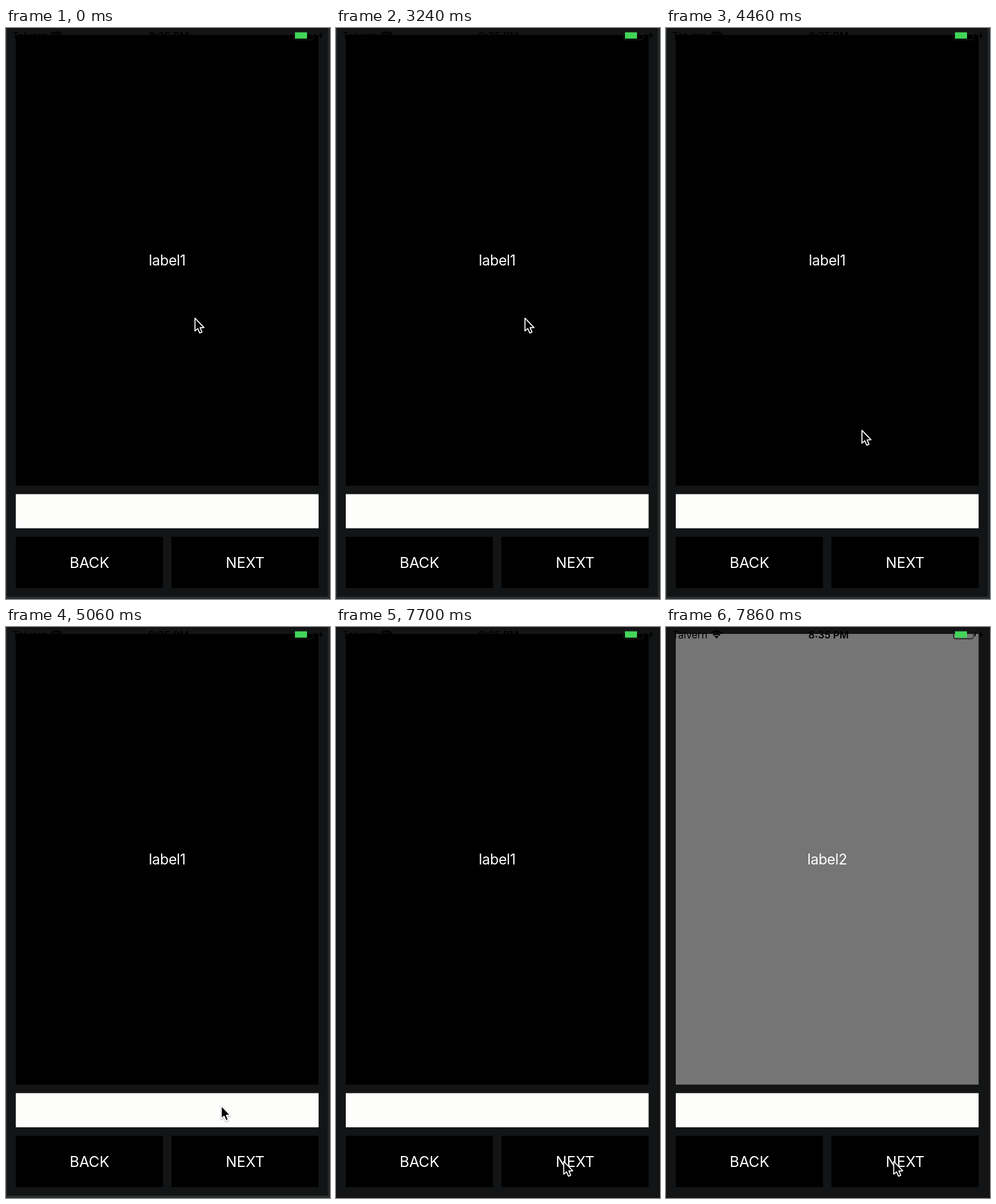
Write an HTML page with a canvas that moves like this. It is 564 px wide and 993 px high and loops after 8000 ms.

```html
<!DOCTYPE html>
<html lang="en">
<head>
<meta charset="utf-8">
<title>Label pager</title>
<style>
html, body { margin: 0; width: 100%; height: 100%; overflow: hidden; background: #121415; }
canvas { display: block; }
</style>
</head>
<body>
<canvas id="stage" width="564" height="993"></canvas>
<script>
const ctx = document.getElementById('stage').getContext('2d');
const LOOP = 8000;
const EDGE_GONE = 7400;
const NEXT_PAGE = 7720;
const FONT = 'Inter, "Open Sans", sans-serif';

// Layout in px: one point of the phone screen is PT wide
const PT = 1.485;
const LEFT = 17, WIDTH = 355 * PT, GAP = 10 * PT;
const BUTTON_W = (WIDTH - GAP) / 2, BUTTON_H = 60 * PT, FIELD_H = 40 * PT;
const BUTTON_Y = 974 - BUTTON_H;
const FIELD_Y = BUTTON_Y - GAP - FIELD_H;
const PANEL_Y = 12, PANEL_H = FIELD_Y - GAP - PANEL_Y;
const NEXT_X = LEFT + BUTTON_W + GAP;

const MOVE = { start: 3845, time: 2326, from: [329, 504.7], to: [396.5, 929.5] };

const easeOut = (u, power) => 1 - (1 - u) ** power;
const mix = (a, b, u) => a + (b - a) * u;

// The pointer slows down towards the button and swings right late
function pointerAt(t) {
  const u = Math.min(1, Math.max(0, (t - MOVE.start) / MOVE.time));
  return [
    mix(MOVE.from[0], MOVE.to[0], easeOut(u, 3) ** 3.37),
    mix(MOVE.from[1], MOVE.to[1], easeOut(u, 2))
  ];
}

function box(x, y, w, h, color) {
  ctx.fillStyle = color;
  ctx.fillRect(x, y, w, h);
}

function text(str, x, y, size, color, { align = 'center', weight = 400, spacing = 0 } = {}) {
  ctx.font = `${weight} ${size}px ${FONT}`;
  ctx.letterSpacing = spacing + 'px';
  ctx.textAlign = align;
  ctx.fillStyle = color;
  ctx.fillText(str, x, y);
}

function windowEdge() {
  box(0, 0, 2, 993, '#26292a');
  box(560, 0, 4, 993, '#25282a');
  box(0, 989, 564, 4, '#2d3031');
}

function wifi(x, y) {
  const from = -Math.PI * 0.75, to = -Math.PI * 0.25;
  ctx.strokeStyle = ctx.fillStyle = '#000';
  ctx.lineWidth = 3;
  for (const r of [12.5, 8]) {
    ctx.beginPath();
    ctx.arc(x, y, r, from, to);
    ctx.stroke();
  }
  ctx.beginPath();
  ctx.moveTo(x, y);
  ctx.arc(x, y, 5, from, to);
  ctx.fill();
}

function battery() {
  ctx.strokeStyle = '#161818';
  ctx.lineWidth = 1.3;
  ctx.beginPath();
  ctx.roundRect(500.5, 5.5, 34.5, 15, 3.5);
  ctx.stroke();
  box(537, 10, 2, 6, '#000');
  box(503, 7.5, 21, 11, '#43d559');
  ctx.fillStyle = '#000';
  ctx.fill(new Path2D('M549.5 6.5L544.5 14H548L546.5 20L552 12H548.5Z'));
}

function statusBar() {
  text('Talvern', 11, 19.5, 17.5, '#000', { align: 'left' });
  wifi(88, 20);
  text('8:35 PM', 283, 19.5, 17.5, '#000', { weight: 600 });
  battery();
}

function button(label, x) {
  box(x, BUTTON_Y, BUTTON_W, BUTTON_H, '#000');
  text(label, x + BUTTON_W / 2 + 0.2, 939, 25.5, '#fff');
}

function pointer([x, y]) {
  const arrow = new Path2D('M0 0V22L4.8 17.8L8.3 25.6L12 24L8.8 16.4L15.5 16.2Z');
  ctx.save();
  ctx.translate(x, y);
  ctx.lineJoin = 'round';
  ctx.lineWidth = 1.6;
  ctx.strokeStyle = '#fff';
  ctx.shadowColor = 'rgba(0,0,0,0.4)';
  ctx.shadowBlur = 3;
  ctx.shadowOffsetY = 1.5;
  ctx.stroke(arrow);
  ctx.shadowColor = 'transparent';
  ctx.fillStyle = '#000';
  ctx.fill(arrow);
  ctx.stroke(arrow);
  ctx.restore();
}

function draw(t) {
  const second = t >= NEXT_PAGE;
  box(0, 0, 564, 993, '#121415');
  if (t < EDGE_GONE) windowEdge();
  box(LEFT, PANEL_Y, WIDTH, PANEL_H, second ? '#757575' : '#000');
  statusBar();
  text(second ? 'label2' : 'label1', LEFT + WIDTH / 2, 413, 25, '#fff', { spacing: -0.35 });
  box(LEFT, FIELD_Y, WIDTH, FIELD_H, '#fdfdfb');
  button('BACK', LEFT);
  button('NEXT', NEXT_X);
  pointer(pointerAt(t));
}

const start = performance.now();
function frame() {
  draw((performance.now() - start) % LOOP);
  requestAnimationFrame(frame);
}
frame();
</script>
</body>
</html>
```
